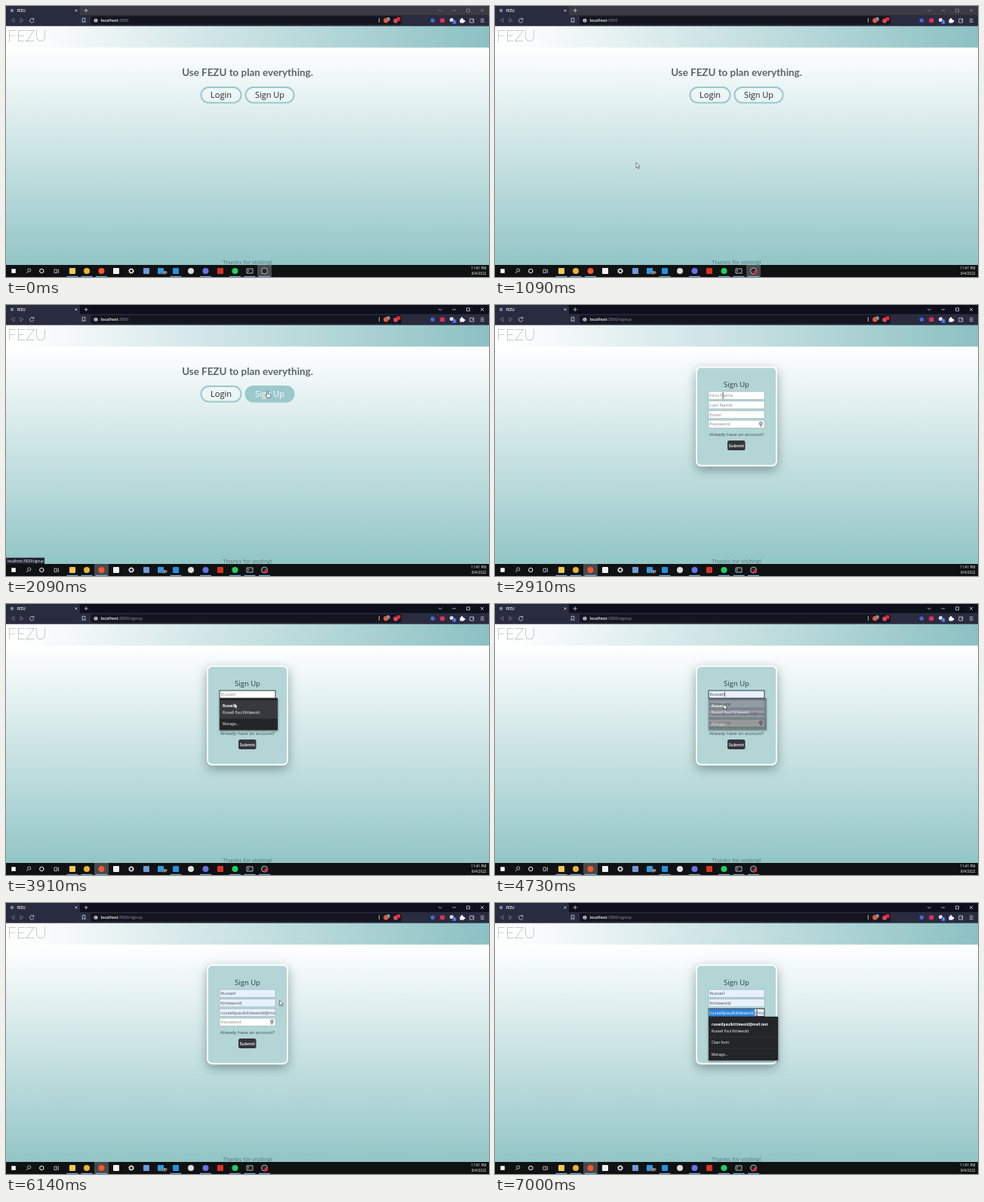
These frames come from a looping animation (640x360 px, 8 s). An HTML page:

```html
<!DOCTYPE html>
<html lang="en">
<head>
<meta charset="utf-8">
<title>Sign-up walkthrough</title>
<style>
html, body { margin: 0; width: 100%; height: 100%; overflow: hidden; background: #fff }
svg { display: block; width: 640px; height: 360px; font-family: "Open Sans", "Noto Sans", sans-serif }
.mid { text-anchor: middle }
.line { fill: none; stroke: #d4d6df; stroke-width: .8 }
.pill { fill: #fff3; stroke: #9bc8ca; stroke-width: 2 }
.small { font-size: 4.7px; fill: #fff }
#signup.hover .pill { fill: #9bc8ca }
#signup.hover text { fill: #fff }
#card { filter: drop-shadow(0 5px 7px #3c5a5f88) }
.field rect { fill: #fff; stroke: #91a5a7; stroke-width: .5 }
.field text { font-size: 6.1px; fill: #858585 }
.field.filled rect { fill: #e8f0fe }
.field.filled text { fill: #4b4b50 }
.field.focus rect { stroke: #333a3c; stroke-width: 1 }
.menu { filter: drop-shadow(0 1px 1.5px #0008) }
</style>
</head>
<body>
<svg viewBox="0 0 640 360">
  <defs>
    <linearGradient id="down" x2="0" y2="1"><stop stop-color="#fff"/><stop offset="1" stop-color="#92c5c6"/></linearGradient>
    <linearGradient id="across"><stop stop-color="#fff"/><stop offset=".08" stop-color="#fafcfc"/><stop offset="1" stop-color="#8cc1c3"/></linearGradient>
  </defs>

  <!-- page -->
  <rect y="55" width="640" height="290" fill="url(#down)"/>
  <rect y="26" width="640" height="29.3" fill="url(#across)"/>
  <text x="2" y="47" font-family="Lato, sans-serif" font-size="21" font-weight="100" fill="#2b383c">FEZU</text>
  <text class="mid" x="320" y="342.8" font-size="7.5" fill="#587576">Thanks for visiting!</text>

  <g id="home">
    <text class="mid" x="320" y="93" font-family="Lato, sans-serif" font-size="13.4" font-weight="700" fill="#5d6666">Use FEZU to plan everything.</text>
    <g font-size="11" class="mid" fill="#20282a">
      <rect class="pill" x="258.5" y="108" width="53" height="20.5" rx="10.2"/><text x="285" y="122.3">Login</text>
      <g id="signup"><rect class="pill" x="317.5" y="108" width="64" height="20.5" rx="10.2"/><text x="349.5" y="122.3">Sign Up</text></g>
    </g>
  </g>

  <g id="form">
    <rect id="card" x="267" y="82.5" width="106" height="131" rx="6" fill="#b3d5d6" stroke="#fff" stroke-width="1.8"/>
    <text class="mid" x="320" y="109" font-size="9.5" fill="#2e3a3c">Sign Up</text>
    <g id="fields"></g>
    <g fill="none" stroke="#555" stroke-width=".8"><circle cx="352.3" cy="157.5" r="2.1"/><path d="M352.3 156v3M351 161h2.6"/></g>
    <text class="mid" x="320" y="173.5" font-size="6.1" fill="#3a4547">Already have an account?</text>
    <rect x="308" y="180" width="23.5" height="13" rx="2.5" fill="#35343c"/>
    <text class="mid" x="319.8" y="188.8" font-size="6" font-weight="600" fill="#fff">Submit</text>
    <path id="caret" d="M304.6 116.5v7" stroke="#222" stroke-width=".6"/>
    <path id="squiggle" d="M284.5 136.4h28" stroke="#d65b5b" stroke-width=".7" stroke-dasharray="1 .5"/>
    <g id="selection">
      <rect x="284" y="141" width="60" height="9.5" fill="#2f86e0"/>
      <text x="284.3" y="147.8" font-size="6.1" fill="#fff">russellpaulkittlewold</text>
    </g>
    <g id="menus"></g>
  </g>

  <!-- browser frame -->
  <rect id="strip" width="640" height="12.5"/>
  <path d="M0 0h96q2 0 2 2v10.5H0z" fill="#292b3f"/>
  <rect y="12" width="640" height="14.7" fill="#292b3f"/>
  <rect x="112" y="13.5" width="412" height="11.2" rx="2" fill="#14151f"/>
  <circle cx="8" cy="6" r="2.3" fill="#7489a5"/>
  <text class="small" x="14.5" y="7.8" font-weight="600">FEZU</text>
  <path class="line" d="M91.5 4.5l3 3m0-3l-3 3M103.7 6h5M106.2 3.5v5"/>
  <path id="controls" class="line" d="M573 5l2.3 2 2.3-2M591.5 6h4.5M610.5 4h4v4h-4zM629 4l4 4m0-4l-4 4"/>
  <path class="line" d="M36.3 17.6a2.7 2.7 0 1 0 .6 2M36.8 15.8v2h-2M101.2 16.3h3.6v5.6l-1.8-1.5-1.8 1.5z"/>
  <path class="line" d="M11 16.5l-4 2.7 4 2.7zM19 16.5l4 2.7-4 2.7z" opacity=".45"/>
  <circle cx="119" cy="19.2" r="2.5" fill="#c5c8d2"/><path d="M119 18.8v2M119 17.3v.6" stroke="#14151f" stroke-width=".8"/>
  <text x="125.5" y="21.1" font-size="5.3" fill="#fff"><tspan font-weight="600">localhost</tspan><tspan fill="#969aab">:3000<tspan id="path"></tspan></tspan></text>
  <path class="line" d="M494.5 16v6"/>
  <circle cx="503.5" cy="19.2" r="3.2" fill="#f0572d"/><rect x="504" y="15.2" width="5" height="4.5" rx="1" fill="#777b8b"/><text class="small" x="505.3" y="19" font-size="4">1</text>
  <circle cx="516.3" cy="19.8" r="3" fill="#d8495f"/><rect x="517.5" y="15" width="5" height="4.8" rx="1" fill="#e52b35"/>
  <circle cx="565.3" cy="19.3" r="2.7" fill="#4669d8"/>
  <rect x="575.2" y="16.5" width="6" height="5.5" rx="1" fill="#e52d5d"/>
  <circle cx="590.5" cy="18.5" r="2.6" fill="#dadde6"/><rect x="591.5" y="19.3" width="5" height="4.8" rx="1" fill="#3f63e5"/><text class="small" x="593" y="23.2">1</text>
  <path d="M601.5 17.7h1.5a1.2 1.2 0 1 1 2.2 0h1.5v1.4a1.2 1.2 0 1 1 0 2.1v1.2h-5.2z" fill="#fff"/>
  <path class="line" d="M614.7 17h5v5h-5zM617.5 19h2.5M628.8 17.2h4.6M628.8 19.3h4.6M628.8 21.4h4.6"/>

  <g id="status">
    <rect y="335.7" width="51" height="9" fill="#202331"/>
    <text class="small" x="2" y="341.8" font-size="4.6">localhost:3000/signup</text>
  </g>

  <!-- taskbar -->
  <rect y="344" width="640" height="16" fill="#101113"/>
  <rect id="active" y="344" width="19" height="16" fill="#47494a"/>
  <rect x="7.3" y="349.3" width="5.5" height="5.5" fill="#fff"/>
  <path class="line" d="M27 355l2-2M32.8 351a2.1 2.1 0 1 1-4.2 0a2.1 2.1 0 1 1 4.2 0M64 350h3.5v4.5H64zM69.5 349.5v5.5"/>
  <circle cx="47.3" cy="352" r="2.7" fill="none" stroke="#fff"/>
  <g id="apps"></g>
  <circle cx="166" cy="352" r="2.4" fill="none" stroke="#f4f4f4" stroke-width="1.3"/>
  <circle cx="166" cy="352" r="3.4" fill="none" stroke="#f4f4f4" stroke-width="1" stroke-dasharray="1.3 1.37"/>
  <rect x="205.5" y="352" width="8" height="4.6" rx="2" fill="#454b52"/><text class="small" x="206" y="355.8" font-size="4">99+</text>
  <path class="line" d="M319 349h8v6h-8zM320.5 350.5l1.5 1.2-1.5 1.2"/>
  <circle cx="342.5" cy="352" r="4" fill="#24272a" stroke="#ddd" stroke-width=".8"/>
  <circle id="recording" cx="344.8" cy="354" r="2.4" fill="#e32636"/>
  <g class="small" text-anchor="end"><text x="636.5" y="349.8">11:41 PM</text><text x="636.5" y="357.3">8/4/2022</text></g>

  <g id="pointer" stroke-linejoin="round">
    <path id="arrow" d="M0 0v7l1.6-1.4 1.2 2.5 1.2-.6-1.1-2.4H5z" fill="#fff" stroke="#333" stroke-width=".6"/>
    <path id="hand" d="M-.8 0q.8-.8 1.5 0v3l3 .8q.8.3.6 1.2L3.7 8H-.2L-2.4 5q0-1 1.6-.2z" fill="#fff" stroke="#333" stroke-width=".6"/>
    <path id="beam" d="M-1.3-3.5h2.6M0-3.5v7M-1.3 3.5h2.6" fill="none" stroke="#333" stroke-width=".6"/>
  </g>
</svg>
<script>
const $ = id => document.getElementById(id);
const show = (id, on) => $(id).style.display = on ? '' : 'none';
const within = (t, from, to) => t >= from && t < to;
const clamp = v => Math.max(0, Math.min(1, v));

const FIRST = 'Russell', LAST = 'Kittlewold', FULL = 'Russell Paul Kittlewold';
const EMAIL = 'russellpaulkittlewold@mail.test';
const LABELS = ['First Name', 'Last Name', 'Email', 'Password'];
const VALUES = [FIRST, LAST, EMAIL];

// Form fields clip their text like real inputs.
$('fields').innerHTML = LABELS.map((label, i) => `<g class="field" transform="translate(283 ${115 + i * 12.7})">
  <rect width="74" height="10.2"/><svg width="73.5" height="10.2"><text x="1.3" y="7.4"></text></svg></g>`).join('');
const fields = [...document.querySelectorAll('.field')];

// Autofill menus: opening time, closing time and place.
const MENUS = [
  { open: 3260, close: 4640, y: 125, w: 77, name: FIRST },
  { open: 5260, close: 5960, y: 138, w: 77, name: LAST, clear: true },
  { open: 6680, close: 9000, y: 151, w: 92, name: EMAIL, clear: true }
];
$('menus').innerHTML = MENUS.map(({ y, w, name, clear }) => {
  const h = clear ? 58 : 42.5;
  const rule = at => `<path d="M0 ${at}h${w}" stroke="#3b3c40" stroke-width=".5"/>`;
  return `<g class="menu" transform="translate(283 ${y})"><rect width="${w}" height="${h}" fill="#242528"/>
    <rect class="hot" y="3" width="${w}" height="24" fill="#38393e"/>${rule(27)}
    <g class="small"><text x="4" y="12.3" font-weight="700">${name}</text><text x="4" y="20.8">${FULL}</text>
    ${clear ? `<text x="4" y="36.2">Clear form</text>${rule(42.3)}` : ''}<text x="4" y="${h - 6.3}">Manage...</text></g></g>`;
}).join('');
const menus = [...document.querySelectorAll('.menu')];
const hots = [...document.querySelectorAll('.hot')];

// Taskbar apps: centre, colour, round, running.
$('apps').innerHTML = [
  [88, '#f2c94f', 0, 1], [107, '#e8b32f', 1, 1], [126.5, '#f4582c', 1, 1], [146, '#f0f1f2', 0, 0],
  [186, '#6f9ad6', 0, 0], [205, '#2c9be8', 0, 0], [225, '#2491de', 0, 1], [245, '#d8dcda', 1, 0],
  [264.5, '#6673e8', 1, 1], [284, '#d8341e', 0, 0], [303.5, '#1ed15f', 1, 1], [323, '#1b1e20', 0, 1], [342.5, '#24272a', 1, 1]
].map(([x, color, round, running]) => `<rect x="${x - 4}" y="348" width="8" height="8" rx="${round ? 4 : 1}" fill="${color}"/>` +
  (running ? `<path d="M${x - 7.5} 359.4h15" stroke="#79b9e8" stroke-width="1.1"/>` : '')).join('');

// Pointer stops: time, x, y.
const STOPS = [
  [250, 643, 300], [820, 158, 248], [1090, 187, 208], [1640, 290, 165], [2000, 346.5, 115],
  [2140, 346.5, 115], [2270, 306, 126], [2410, 306, 126], [3000, 302, 120], [3730, 302, 120],
  [3900, 302.3, 131.5], [4410, 303, 133], [5400, 303, 133], [5760, 369.5, 121.5],
  [5980, 369.5, 121.5], [6410, 347, 146], [8000, 347, 146]
];
function pointerAt(t) {
  const i = STOPS.findIndex(stop => stop[0] > t);
  if (i < 1) return STOPS[0].slice(1);
  const [t0, x0, y0] = STOPS[i - 1], [t1, x1, y1] = STOPS[i];
  const u = (t - t0) / (t1 - t0), e = u * u * (3 - 2 * u);
  return [x0 + (x1 - x0) * e, y0 + (y1 - y0) * e];
}

function draw(t) {
  const signingUp = t >= 2200, focused = t >= 1980, filled = t >= 4640;
  const preview = within(t, 3860, 4640);
  show('home', !signingUp);
  show('form', signingUp);
  show('status', within(t, 1940, 2480));
  show('recording', t >= 400);
  $('signup').classList.toggle('hover', t >= 1900);
  $('path').textContent = signingUp ? '/signup' : '';
  $('strip').setAttribute('fill', focused ? '#0d0f1d' : '#3c3b43');
  $('controls').style.opacity = focused ? 1 : .45;
  $('active').setAttribute('x', focused ? 117 : 333);

  const current = t < 3230 ? -1 : t < 5220 ? 0 : t < 5960 ? 1 : t < 6640 ? -1 : 2;
  fields.forEach((field, i) => {
    const hasValue = filled && i < 3;
    field.classList.toggle('filled', hasValue);
    field.classList.toggle('focus', i === current);
    field.querySelector('text').textContent = hasValue || preview && i < 3 ? VALUES[i] : LABELS[i];
  });
  show('caret', within(t, 4640, 5220));
  show('squiggle', current === 1);
  show('selection', current === 2);

  menus.forEach((menu, i) => {
    const { open, close } = MENUS[i];
    menu.style.opacity = Math.min(clamp((t - open) / 120), clamp(1 - (t - close) / 170));
    hots[i].style.display = i === 0 && within(t, 3860, 4820) ? '' : 'none';
  });

  const [x, y] = pointerAt(t);
  const beam = within(t, 2700, 3820) || within(t, 4900, 5480) || t >= 6280;
  const hand = within(t, 1900, 2200);
  $('pointer').setAttribute('transform', `translate(${x} ${y})`);
  show('beam', beam);
  show('hand', hand);
  show('arrow', !beam && !hand);
}

function tick() {
  draw(performance.now() % 8000);
  requestAnimationFrame(tick);
}
tick();
</script>
</body>
</html>
```
